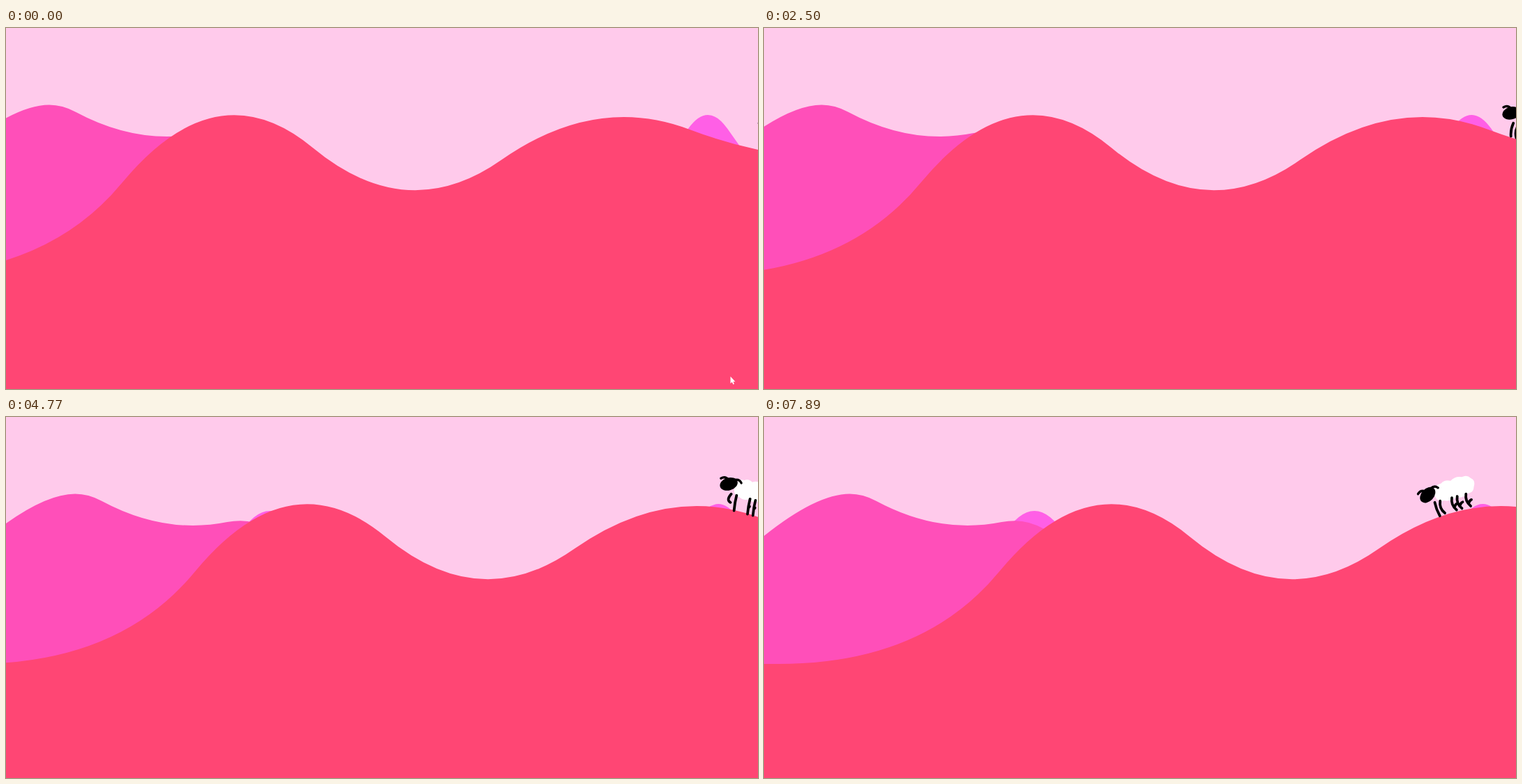
Animation, 1079 px wide and 519 px high, one loop 8000 ms. Source, as an HTML page:

```html
<!DOCTYPE html>
<html lang="en">
<head>
<meta charset="utf-8">
<title>Sheep on the hills</title>
<style>
html, body { margin: 0; width: 100%; height: 100%; overflow: hidden; background: #ffcaeb; }
svg { display: block; width: 1079px; height: 519px; }
</style>
</head>
<body>
<svg viewBox="0 0 1079 519">
  <rect width="1079" height="519" fill="#ffcaeb"/>
  <g id="back" fill="#ff5fe6">
    <path d="M318.6 171Q363.6 99 408.6 171Z"/>
    <path d="M960 171L979 144.6Q1007 105.4 1035 144.6L1060 180Z"/>
  </g>
  <path id="mid" fill="#ff4fb9" d="M-140 520V234L-61 171Q14.6 110.5 62 110.5Q81 110.5 100 120.7Q165.6 156 231 156Q255.5 156 280 151.1Q289.5 149.2 299 149.2Q320 149.2 341 161L400 196V520Z"/>
  <path id="front" fill="#ff4674"/>
  <g id="sheep">
    <path id="wool" fill="#fff" d="M-20-36Q-16-47-6-46Q0-50 8-46Q16-51 25-47Q33-49 37-42Q43-37 38-29Q36-21 27-22Q18-17 10-21Q0-17-8-21Q-20-20-20-36Z"/>
    <g id="rear">
      <ellipse cx="38" cy="-25" rx="7" ry="9" fill="#fff"/>
      <ellipse cx="30" cy="-34" rx="9" ry="7" transform="rotate(-30 30 -34)"/>
      <path d="M34-38Q40-40 43-36" fill="none" stroke="#000" stroke-width="3" stroke-linecap="round"/>
    </g>
    <path id="legs" fill="none" stroke="#000" stroke-width="3.8" stroke-linecap="round" stroke-linejoin="round"/>
    <ellipse cx="-29" cy="-35" rx="13" ry="9" transform="rotate(-32 -29 -35)"/>
    <path d="M-31-41Q-37-45-42-40M-22-43Q-16-46-12-41" fill="none" stroke="#000" stroke-width="3.4" stroke-linecap="round"/>
  </g>
  <path id="cursor" fill="#fff" d="M1039.5 501v10l2.3-2 1.6 3.4 1.5-.7-1.5-3.2h3z"/>
</svg>
<script>
const LOOP = 8000, STEP = 138.4, STRIDE = 475;
const SPEED = 20.85; // front hill, px per second
const RIDGE = 'M-300 355H-150Q58 355 167 222Q302.6 58 440 172Q576 285 711 189.6Q846.5 94.7 981 146Q1117 197.5 1252 186.6';
const HIPS = [-22, -14, 6, 14, 27];

const el = id => document.getElementById(id);
const clamp = v => Math.max(0, Math.min(1, v));
const shift = (id, x) => el(id).setAttribute('transform', `translate(${x.toFixed(2)} 0)`);

const ridge = document.createElementNS('http://www.w3.org/2000/svg', 'path');
ridge.setAttribute('d', RIDGE);
const ridgeLength = ridge.getTotalLength();

// Height of the front hill at x, found by bisection along the ridge
function hillAt(x) {
  let a = 0, b = ridgeLength;
  for (let i = 0; i < 18; i++) {
    const m = (a + b) / 2;
    if (ridge.getPointAtLength(m).x < x) a = m; else b = m;
  }
  return ridge.getPointAtLength(a).y;
}

// The first leg lifts at the start of a stride, the others half a stride later
function legsPath(phase) {
  const swing = clamp(0.5 + 0.7 * Math.cos(phase * 2 * Math.PI));
  return HIPS.map((hip, i) => {
    const lift = i ? 1 - swing : swing;
    const hind = i > 1;
    const x = hind ? hip - 3 * lift : hip;
    const foot = -lift * (i ? 4 : 10);
    const leg = `M${x} -22Q${x - 5 * lift} -12 ${x + 2} ${foot}`;
    return hind ? leg + `M${x + 1} -9q2 -3 ${5 * lift} -3` : leg;
  }).join('');
}

function draw(now) {
  const t = now % LOOP;
  const held = Math.floor(t / STEP) * STEP;
  const sec = held / 1000;

  const scroll = 6.3 * clamp(held / 390) + SPEED * sec;
  shift('back', scroll / 7);
  shift('mid', scroll * 5 / 14);
  shift('front', scroll);

  const walk = sec - 2.5;
  const x = 1090 - 13 * walk - 1.05 * walk * walk;
  const y = hillAt(x - scroll) + 1;
  const rise = hillAt(x - scroll + 4) - hillAt(x - scroll - 4);
  const angle = Math.atan2(rise, 8) * 180 / Math.PI;
  el('sheep').setAttribute('transform',
    `translate(${x.toFixed(2)} ${y.toFixed(2)}) rotate(${angle.toFixed(2)})`);

  const phase = (held - 41 * STEP) / STRIDE;
  const turn = Math.abs(phase - Math.round(phase)) < 1 / 16;
  el('legs').setAttribute('d', legsPath(phase));
  el('rear').style.display = turn ? '' : 'none';
  el('wool').setAttribute('transform', turn ? 'translate(-3.6 0) scale(.82 1)' : '');
  el('cursor').style.display = t < 70 ? '' : 'none';
}

el('front').setAttribute('d', RIDGE + 'V520H-300Z');
const start = performance.now();
function loop() {
  draw(performance.now() - start);
  requestAnimationFrame(loop);
}
loop();
</script>
</body>
</html>
```
